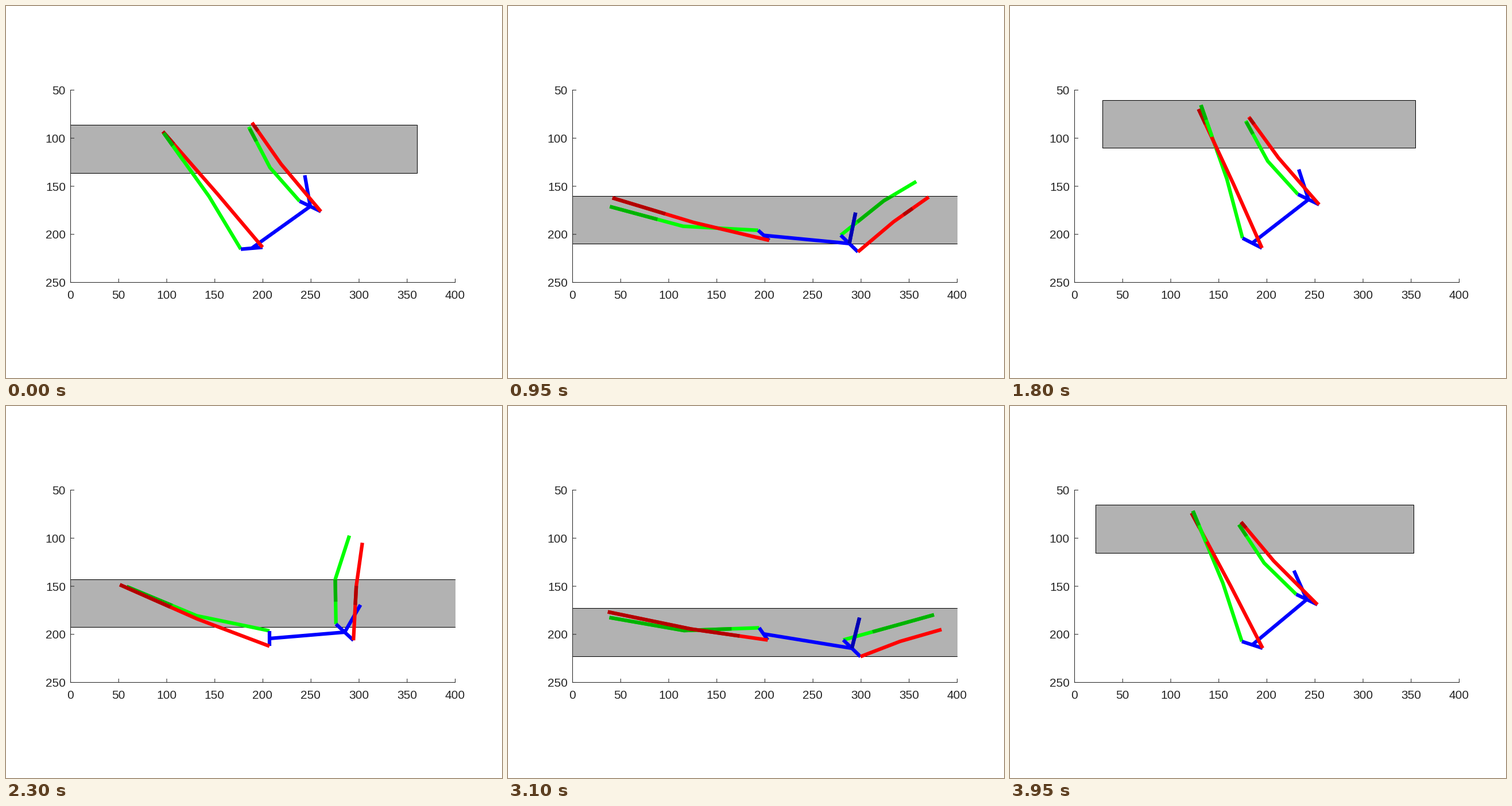
Recreate the animation shown at these times as a matplotlib script. Size 864x648 px, loop 4000 ms.

```python
import numpy as np
import matplotlib.pyplot as plt
from matplotlib.animation import FuncAnimation
from matplotlib.patches import Rectangle

W, H, DPI = 864, 648, 150
X0, X1, Y0, Y1 = 112.5, 782.5, 146.5, 481.5
UNIT = (X1 - X0) / 400
STEP = 50
INK, GREEN, RED, BLUE = "#262626", "#00ff00", "#ff0000", "#0000ff"
DARK = {GREEN: "#00b200", RED: "#b20000", BLUE: "#0000b2"}


def pose(hip, chest, tilt, leg, arm, head):
    """Trunk ends in pixels; hip tilt, leg, arm and head angles in degrees."""
    return np.array([*hip, *chest, tilt, leg, arm, head], float)


folded = pose((428, 422), (530, 349), -5, 53, 126, 100)
opening = pose((456, 398), (597, 389), 80, 12.2, 67, 85)
rising = pose((445, 413), (552, 359), 5, 53, 130, 98)
tucked = pose((422, 413), (520, 337), 27, 69.2, 127, 108)
lowering = pose((459, 405), (590, 394), 90, 19.7, 83, 60)
flat = pose((445, 397), (599, 422), 55, 6.9, 17, 76)
closed = pose((422, 416), (517, 337), 18, 66, 131, 114)


def mix(p, q, s):
    return p + (q - p) * s


keys = [(50, folded), (500, opening), (820, mix(opening, flat, 0.95)),
        (1350, rising), (1600, mix(rising, tucked, 1.25)), (1800, tucked),
        (2300, lowering), (2750, mix(lowering, flat, 0.93)), (3100, flat),
        (3850, mix(flat, closed, 0.97)), (3950, closed)]
times = np.array([k[0] for k in keys], float)
values = np.array([k[1] for k in keys])

# Monotone cubic slopes
rate = np.diff(values, axis=0) / np.diff(times)[:, None]
product = rate[:-1] * rate[1:]
total = np.where(product > 0, rate[:-1] + rate[1:], 1)
slopes = np.zeros_like(values)
slopes[1:-1] = np.where(product > 0, 2 * product / total, 0)
slopes[0] = rate[0]


def pose_at(t):
    t = np.clip(t, times[0], times[-1])
    i = min(np.searchsorted(times, t, side="right") - 1, len(times) - 2)
    h = times[i + 1] - times[i]
    s = (t - times[i]) / h
    return ((1 + 2 * s) * (1 - s) ** 2 * values[i]
            + s * (1 - s) ** 2 * h * slopes[i]
            + s * s * (3 - 2 * s) * values[i + 1]
            + s * s * (s - 1) * h * slopes[i + 1])


def smooth(x, lo, hi):
    s = np.clip((x - lo) / (hi - lo), 0, 1)
    return s * s * (3 - 2 * s)


def bone(angle, length):
    return length * np.exp(-1j * np.radians(angle))


def limb(root, angle, upper, lower, bend):
    mid = root + bone(angle - bend / 2, upper)
    return np.array([root, mid, mid + bone(angle + bend / 2, lower)])


def stretch(z, lo, hi):
    """Part of a limb: 0 is the root, 1 the middle joint, 2 the tip."""
    u = [lo, *[k for k in (1,) if lo < k < hi], hi]
    return np.interp(u, range(3), z.real) + 1j * np.interp(u, range(3), z.imag)


def place(line, z):
    z = np.asarray(z)
    line.set_data(z.real, z.imag)


fig = plt.figure(figsize=(W / DPI, H / DPI), dpi=DPI, facecolor="white")
ax = fig.add_axes([0, 0, 1, 1])
ax.set(xlim=(0, W), ylim=(H, 0))
ax.axis("off")


def rule(xs, ys):
    ax.plot(xs, ys, color=INK, lw=0.5, zorder=2, snap=False,
            solid_capstyle="projecting")


def label(x, y, value, align):
    ax.text(x, y, str(value), ha=align, va="baseline", color=INK,
            family="Liberation Sans", size=10)


rule([X0, X0], [Y0, Y1])
rule([X0, X1], [Y1, Y1])
for v in range(0, 401, 50):
    x = X0 + v * UNIT
    rule([x, x], [Y1, Y1 - 6])
    label(x - 0.5, 510, v, "center")
for v in range(50, 251, 50):
    y = Y0 + (v - 50) * UNIT
    rule([X0, X0 + 6], [y, y])
    label(104, y + 7.5, v, "right")

band = Rectangle((0, 0), 1, 50 * UNIT, fc="#b2b2b2", ec="black", lw=0.5, zorder=1)
ax.add_patch(band)
band.set_clip_path(Rectangle((X0, Y0), X1 - X0, Y1 - Y0, transform=ax.transData))
window = Rectangle((0, 0), 1, 50 * UNIT, transform=ax.transData)


def stroke(color, z):
    return ax.plot([], [], color=color, lw=3, zorder=z,
                   solid_capstyle="butt", solid_joinstyle="miter")[0]


trunk = [stroke(BLUE, 4) for _ in range(4)]
neck_shade = stroke(DARK[BLUE], 4.1)
limbs = [(stroke(color, z), stroke(DARK[color], z + 0.1))
         for color, z in ((GREEN, 3), (RED, 5)) * 2]
shin_front = stroke(GREEN, 6)


def draw(n):
    hx, hy, cx, cy, tilt, leg, arm, nod = pose_at(n * STEP)
    hip, chest = complex(hx, hy), complex(cx, cy)
    lift = smooth(leg, 15, 45)
    reach = smooth(arm, 60, 20)

    # Bodies foreshorten as they fold, so lengths follow the lift.
    hip_half = bone(-tilt, 13 + 6 * lift)
    chest_half = complex(15 + 3.5 * lift, 14.5 - 5.5 * lift)
    fan = 6.7 * lift - 3
    parts = [
        limb(hip - hip_half, 180 - leg - fan, 131 - 24 * lift, 132 + 4 * lift,
             16.5 * lift - 12),
        limb(hip + hip_half, 180 - leg + fan, 135 - 13 * lift, 148 - 4 * lift,
             4.5 * lift - 3.5),
        limb(chest - chest_half, arm - 1.5, 78 + 28 * reach, 80 - 22 * reach,
             8 - 27 * np.sin(np.radians(arm))),
        limb(chest + chest_half, arm + 1.5, 94 + 14 * lift - 20 * reach,
             75 + 13 * lift, -5)]
    hips, shoulders = (parts[0][0], parts[1][0]), (parts[2][0], parts[3][0])
    neck = chest, chest + bone(nod, 55)

    xs = np.concatenate(parts).real
    left, right = xs.min() - 100 * UNIT, xs.max() + 100 * UNIT
    top = hy - (272 - 18 * lift) * np.sin(np.radians(leg)) - 12
    for box in (band, window):
        box.set_xy((left, top))
        box.set_width(right - left)

    for line, ends in zip(trunk, (hips, shoulders, (hip, chest), neck)):
        place(line, ends)
    place(neck_shade, neck)
    neck_shade.set_visible(top > 315)
    neck_shade.set_clip_path(window)

    # Limb stretches lying behind the translucent band
    leg_shade = np.interp(leg, [5, 12, 20, 52], [0, 1.35, 1.35, 1.8]), 2
    turn = [17, 67, 83, 128]
    start = np.interp(arm, turn, [0.5, 0.2, 0.5, 1.7])
    end = np.interp(arm, turn, [2, 0.8, 1, 2])
    far_shade = max(start + 0.15, 2 * reach), end
    shades = leg_shade, leg_shade, (start, end), far_shade
    for (line, dark), part, (lo, hi) in zip(limbs, parts, shades):
        place(line, part)
        dark.set_visible(hi - lo > 0.01)
        if hi > lo:
            place(dark, stretch(part, lo, hi))
        dark.set_clip_path(window)

    # Raised feet cross: the left shin ends up in front.
    raised = lift > 0.5
    place(shin_front, stretch(parts[0], 1.57, 2))
    shin_front.set_visible(raised)
    limbs[0][1].set_zorder(6.1 if raised else 3.1)


anim = FuncAnimation(fig, draw, frames=80, interval=STEP, repeat=True,
                     repeat_delay=0, init_func=lambda: draw(0), blit=False)
plt.show()
```
